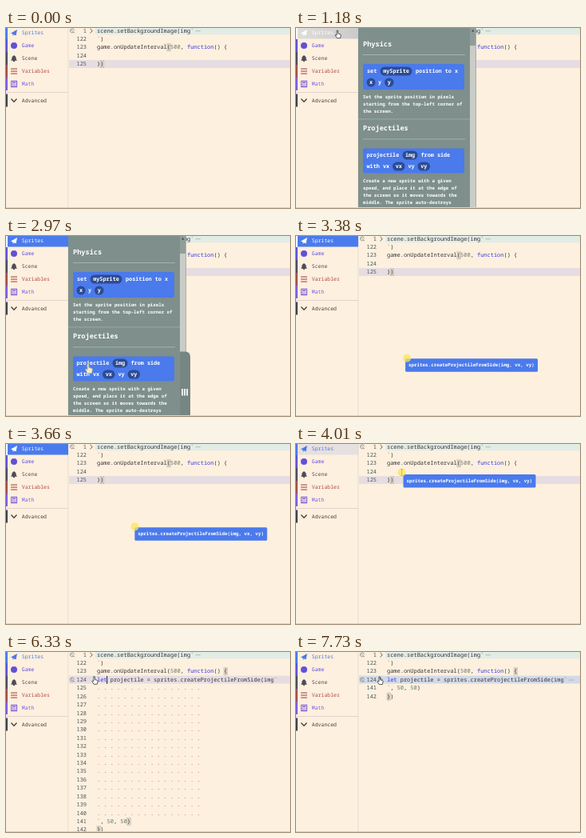
Write an HTML page with a canvas that moves like this. It is 356x225 px and loops after 8 s.

```html
<!DOCTYPE html>
<html lang="en">
<head>
<meta charset="utf-8">
<title>Drag a block into code</title>
<style>
html, body { margin: 0; width: 100%; height: 100%; overflow: hidden; background: #fdf0de; }
canvas { display: block; width: 356px; height: 225px; }
</style>
</head>
<body>
<canvas id="stage"></canvas>
<script>
const W = 356, H = 225, LOOP = 8000;
const CHAR = 4.185, ROW = 10.42, CODE_X = 114;
const INK = '#343238', BLUE = '#3434e4', RED = '#ad4438', GREEN = '#66806a';
const BLOCK = '#4a7aec';
const canvas = document.getElementById('stage');
const ctx = canvas.getContext('2d');
const dpr = window.devicePixelRatio || 1;
canvas.width = W * dpr;
canvas.height = H * dpr;

// Times of the hard changes
const OPEN = 980, SELECT = 1400, TAB = 1800, PRESS = 2840, DRAG = 3170,
  UNSELECTED = 4030, DROP = 4200, INSERT = 4850, SETTLE = 5050, FOLD = 7600;

const pointerPath = [
  [130, 280, 178], [480, 170, 80], [780, 70, 14], [910, 53, 8], [1180, 53, 8],
  [1450, 95, 45], [1750, 139, 105], [2440, 105, 166], [3170, 105, 166],
  [3380, 139, 153], [3680, 163, 100], [3940, 132.5, 35.5], [4200, 132.5, 35.5],
  [4430, 127, 35], [5970, 127, 35], [6470, 106, 36]
];
const blockPath = [[3170, 105, 167], [3380, 137, 153.5], [3680, 163, 101], [3940, 134.5, 38]];

function along(path, t) {
  const i = path.findIndex(p => p[0] > t);
  if (i < 0) return path[path.length - 1].slice(1);
  if (i === 0) return path[0].slice(1);
  const [t0, x0, y0] = path[i - 1], [t1, x1, y1] = path[i];
  const k = (t - t0) / (t1 - t0);
  return [x0 + (x1 - x0) * k, y0 + (y1 - y0) * k];
}

function rect(x, y, w, h, color) {
  ctx.fillStyle = color;
  ctx.fillRect(x, y, w, h);
}

function round(x, y, w, h, r, color) {
  ctx.fillStyle = color;
  ctx.beginPath();
  ctx.roundRect(x, y, w, h, r);
  ctx.fill();
}

function line(points, color, width = 1) {
  ctx.strokeStyle = color;
  ctx.lineWidth = width;
  ctx.beginPath();
  points.forEach(([x, y]) => ctx.lineTo(x, y));
  ctx.stroke();
}

function polygon(points, color) {
  ctx.fillStyle = color;
  ctx.beginPath();
  points.forEach(([x, y]) => ctx.lineTo(x, y));
  ctx.fill();
}

function circle(x, y, r, color) {
  ctx.fillStyle = color;
  ctx.beginPath();
  ctx.arc(x, y, r, 0, Math.PI * 2);
  ctx.fill();
}

function text(str, x, y, size, color, weight = 400, align = 'left') {
  ctx.font = `${weight} ${size}px "Noto Sans Mono", monospace`;
  ctx.textAlign = align;
  ctx.fillStyle = color;
  ctx.fillText(str, x, y);
}

const rowY = row => 3.6 + row * ROW;

function code(row, parts) {
  let x = CODE_X;
  for (const [str, color] of parts) {
    text(str, x, rowY(row), CHAR / 0.6, color);
    x += str.length * CHAR;
  }
}

function lineNumber(row, number) {
  text(number, 101, rowY(row), CHAR / 0.6, '#46575e', 400, 'right');
}

function rowFill(row, color, x = 79) {
  rect(x, rowY(row) - ROW / 2, W - x, ROW - 0.6, color);
}

function bracketBox(row, column) {
  const x = CODE_X + column * CHAR, y = rowY(row) - 4.7;
  rect(x, y, CHAR + 0.4, 9.2, '#ddd5c8');
  ctx.strokeStyle = '#c0b8ac';
  ctx.lineWidth = 0.5;
  ctx.strokeRect(x, y, CHAR + 0.4, 9.2);
}

function foldMark(row, columns) {
  const y = rowY(row), x = CODE_X + columns * CHAR + 2.5;
  line([[105.5, y - 2.7], [108.3, y], [105.5, y + 2.7]], '#4c4c50', 0.9);
  for (let i = 0; i < 3; i++) rect(x + i * 2.2, y - 0.3, 1.2, 0.9, '#8a8c8c');
}

function imageGlyph(row) {
  const y = rowY(row);
  ctx.strokeStyle = '#777f82';
  ctx.lineWidth = 0.8;
  ctx.beginPath();
  ctx.arc(83, y - 0.3, 2.5, 0.9, 6.2);
  ctx.stroke();
  circle(82.3, y - 0.9, 0.6, '#777f82');
  line([[83.2, y], [86, y + 2.6]], '#777f82', 0.8);
}

function caret(row, column) {
  rect(CODE_X + column * CHAR - 0.4, rowY(row) - 5, 1, ROW - 0.4, '#222226');
}

function drawEditor(t) {
  const inserted = t >= INSERT, settled = t >= SETTLE, folded = t >= FOLD;
  rowFill(0, '#e2ece7', 112);
  if (folded) rowFill(3, '#d3d9e6');
  else rowFill(t < DROP ? 4 : 3, '#e6dde2');

  if (t < DROP) { bracketBox(2, 21); bracketBox(4, 1); }
  if (settled) { bracketBox(2, 38); bracketBox(folded ? 5 : 21, 0); }
  if (inserted && t < 5510) bracketBox(3, 49);
  if (inserted && !folded) bracketBox(20, 9);

  if (t < INSERT || settled) imageGlyph(0);
  if (settled) imageGlyph(3);

  lineNumber(0, 1);
  code(0, [['scene.setBackgroundImage(img', INK], ['`', RED]]);
  foldMark(0, 29);
  lineNumber(1, 122);
  code(1, [['`', RED], [')', INK]]);
  lineNumber(2, 123);
  code(2, [['game.onUpdateInterval(', INK], ['500', GREEN], [', ', INK], ['function', BLUE], ['() {', INK]]);
  lineNumber(3, 124);

  if (!inserted) {
    lineNumber(4, 125);
    code(4, [['})', INK]]);
    if (t >= DROP && t < 4630) caret(3, 0);
    return;
  }

  code(3, [['let', BLUE], [' projectile = sprites.createProjectileFromSide(img', INK], ['`', RED]]);
  if (folded) foldMark(3, 54);
  else for (let i = 0; i < 16; i++) {
    lineNumber(4 + i, 125 + i);
    code(4 + i, [['. '.repeat(16), RED]]);
  }
  const end = folded ? 4 : 20;
  lineNumber(end, 141);
  code(end, [['`', RED], [', ', INK], ['50', GREEN], [', ', INK], ['50', GREEN], [')', INK]]);
  lineNumber(end + 1, 142);
  code(end + 1, [['})', INK]]);
  const caretOn = t < 5510 || Math.floor((t - 5010) / 500) % 2 === 0;
  if (caretOn && t < 7510) caret(3, 3);
}

const icons = {
  Sprites(y, c) {
    polygon([[6, y + 0.5], [14, y - 4], [12.5, y + 3.5], [10, y + 2.2], [8.8, y + 4], [8.5, y + 1.5]], c);
  },
  Game(y, c) { circle(10, y, 4, c); },
  Scene(y, c) {
    polygon([[10, y - 4], [12.3, y - 2], [13, y + 1.5], [14, y + 2.8], [6, y + 2.8], [7, y + 1.5], [7.7, y - 2]], c);
    circle(10, y + 3, 1.2, c);
  },
  Variables(y, c) {
    for (const d of [-3, 0, 3]) rect(6, y + d - 0.5, 8, 1.1, c);
  },
  Math(y, c) {
    ctx.strokeStyle = c;
    ctx.lineWidth = 1.1;
    ctx.strokeRect(6.7, y - 3.7, 6.8, 7.4);
    rect(8, y - 2.4, 4.2, 1.5, c);
    for (let i = 0; i < 4; i++) rect(8 + (i % 2) * 2.6, y + 0.2 + (i >> 1) * 1.7, 1.5, 1.1, c);
  },
  Advanced(y, c) { line([[6.5, y - 2], [10, y + 1.7], [13.5, y - 2]], c, 1.3); }
};

const categories = [
  ['Sprites', 6, '#4b78e8'], ['Game', 22, '#6350d6'], ['Scene', 38, '#4b4c59'],
  ['Variables', 54, '#ad4a48'], ['Math', 70, '#8359dc'], ['Advanced', 90.5, '#423f45']
];

// Paints the highlight of the first category; true while its label is white.
function drawHighlight(t) {
  if (t >= 790 && t < SELECT) {
    const fade = ctx.createLinearGradient(0, 0, 78, 0);
    fade.addColorStop(0, '#e0dedb');
    fade.addColorStop(1, '#cbcbc9');
    rect(0, 0, 78, 13.5, fade);
    return true;
  }
  if (t < SELECT || t >= UNSELECTED) return false;
  const alpha = Math.min(1, (UNSELECTED - t) / 150);
  ctx.globalAlpha = alpha;
  rect(0, 0, 78, 13.5, '#4a7bed');
  ctx.globalAlpha = 1;
  return alpha > 0.5;
}

function drawSidebar(t) {
  rect(0, 0, 78, H, '#fdf0de');
  rect(77.5, 0, 0.8, H, '#e3dad0');
  rect(0, 80, 78, 0.8, '#d8cfcb');
  const highlighted = drawHighlight(t);
  for (const [name, y, color] of categories) {
    const ink = highlighted && name === 'Sprites' ? '#fff' : color;
    rect(0, y - 8, 2, 16, ink);
    icons[name](y, ink);
    text(name, 19.8, y + 0.3, 6.5, ink);
  }
}

function heading(str, y) {
  text(str, 84, y, 8.6, '#fff', 600);
  rect(84, y + 12.5, 128, 0.8, '#b3bcba');
}

function paragraph(lines, y) {
  lines.forEach((str, i) => text(str, 84, y + i * 9.1, 5.78, '#fff', 700));
}

const label = (str, x, y) => text(str, x, y, 6.8, '#fff', 600);

function pill(str, x, y, w) {
  round(x, y - 5.5, w, 11, 5.5, '#2c4b93');
  text(str, x + w / 2, y, 6.8, '#fff', 700, 'center');
}

function drawFlyout(t) {
  rect(78, 0, 147.5, H, '#7e8f8c');
  rect(218, 0, 7.5, H, '#919d9a');
  rect(218, 22, 7, H, '#c9ccc8');
  polygon([[220, 4.5], [223.4, 4.5], [221.7, 2]], '#3f4846');

  heading('Physics', 20.5);
  round(84, 45, 127, 32, 2, BLOCK);
  label('set', 89, 54);
  pill('mySprite', 105.5, 54, 40);
  label('position to x', 150, 54);
  pill('x', 88.5, 68, 11);
  label('y', 103, 68);
  pill('y', 111, 68, 11.5);
  paragraph(['Set the sprite position in pixels', 'starting from the top-left corner of', 'the screen.'], 86);

  rect(78, 113.5, 140, 0.8, '#a4afad');
  heading('Projectiles', 126);
  round(84, 150.5, 127, 31, 2, BLOCK);
  label('projectile', 88.5, 159);
  pill('img', 133.5, 159, 19);
  label('from side', 156.5, 159);
  label('with vx', 88.5, 173);
  pill('vx', 121, 173, 15.5);
  label('vy', 140.5, 173);
  pill('vy', 152.5, 173, 15.5);
  paragraph(['Create a new sprite with a given', 'speed, and place it at the edge of',
    'the screen so it moves towards the', 'middle. The sprite auto-destroys', 'when all pixels are off screen.'], 191);

  if (t >= TAB) {
    round(218, 144.5, 13, 90, [0, 6, 0, 0], '#768683');
    for (let i = 0; i < 3; i++) rect(220.2 + i * 3, 191, 1.7, 8.5, '#fff');
  }
}

function drawDraggedBlock(t) {
  const [x, y] = along(blockPath, t);
  round(x, y, 166, 16.5, 1.5, BLOCK);
  text('sprites.createProjectileFromSide(img, vx, vy)', x + 4, y + 8.3, 5.85, '#fff', 600);
}

function hand(x, y, scale, fill, outline) {
  ctx.beginPath();
  [[-2, -5], [-0.6, -5], [-0.4, -1.2], [2.6, -0.4], [3.2, 0.6], [2.4, 4.5], [-1.8, 4.5], [-4, 0.8], [-3.2, 0], [-2, 1]]
    .forEach(([dx, dy]) => ctx.lineTo(x + dx * scale, y + dy * scale));
  ctx.closePath();
  ctx.fillStyle = fill;
  ctx.fill();
  ctx.strokeStyle = outline;
  ctx.lineWidth = 0.8;
  ctx.stroke();
}

function beam(x, y, color) {
  line([[x, y - 4], [x, y + 4]], color, 0.8);
  for (const d of [-4, 4]) line([[x - 1.5, y + d], [x + 1.5, y + d]], color, 0.7);
}

function arrow(x, y) {
  const points = [[x, y - 4], [x, y + 4], [x + 2, y + 2.3], [x + 5, y + 2]];
  polygon(points, '#fff');
  line([...points, points[0]], '#333', 0.6);
}

function drawPointer(t) {
  if (t < 130) return;
  const [x, y] = along(pointerPath, t);
  const dragging = t >= DRAG && t < DROP;
  if (dragging) circle(x, y, 5, 'rgba(250,230,85,.75)');
  if (dragging && t < 3900) return;
  if (t >= PRESS && t < DRAG) hand(x - 0.5, y, 1.25, '#f3eebb', '#a9a98a');
  else if (x < 78 || (t >= 2000 && t < DRAG) || (t > 6000 && x < 112)) hand(x, y, 1, '#fff', '#333');
  else if (t >= OPEN && t < DRAG) arrow(x, y);
  else beam(x, y, dragging ? '#c9b545' : '#55524e');
}

function frame(now) {
  const t = now % LOOP;
  ctx.setTransform(dpr, 0, 0, dpr, 0, 0);
  ctx.textBaseline = 'middle';
  ctx.textRendering = 'geometricPrecision';
  rect(0, 0, W, H, '#fdf0de');
  drawEditor(t);
  drawSidebar(t);
  if (t >= OPEN && t < DRAG) drawFlyout(t);
  rect(0, 224, W, 1, '#d9d1c8');
  if (t >= DRAG && t < DROP) drawDraggedBlock(t);
  drawPointer(t);
}

const start = performance.now();
function tick() {
  frame(performance.now() - start);
  requestAnimationFrame(tick);
}
tick();
</script>
</body>
</html>
```
